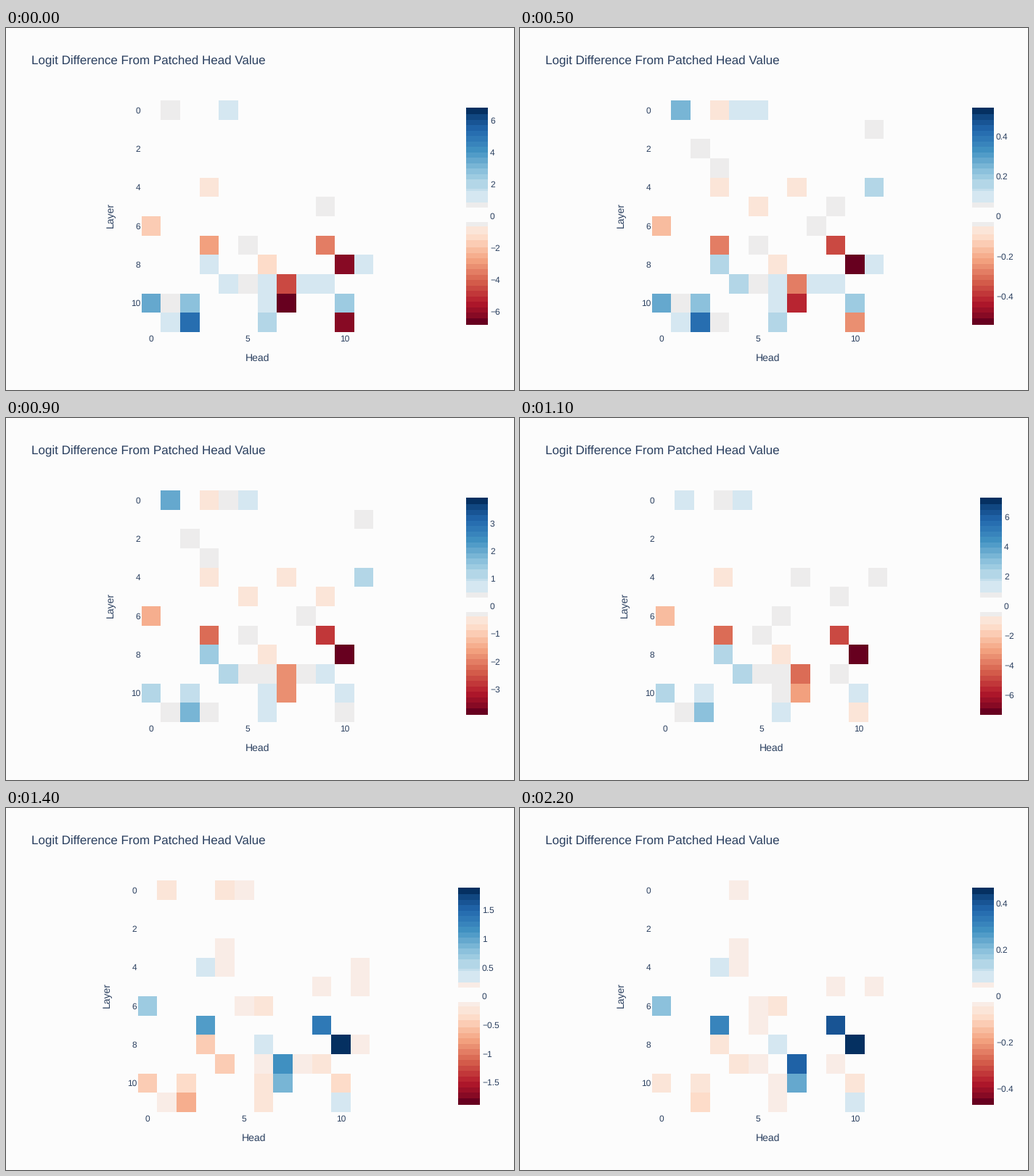
Animation of 700 by 500 pixels, one loop 2.3 s. Source, as a matplotlib script:

```python
import numpy as np
import matplotlib.pyplot as plt
from matplotlib.animation import FuncAnimation

W, H, DPI = 700, 500, 100
FRAMES, INTERVAL = 23, 100
N, TOP, LEFT = 12, 100, 181.7
CELL_W, CELL_H = 319.75 / N, 320 / N
BAR_TOP, BAR_MID, BAR_H = 110, 260, 300
INK = "#2a3f5f"
PAPER = np.array([252, 252, 252])
GREY, CREAM = (237, 236, 236), (249, 236, 230)

plt.rcParams["font.family"] = "Liberation Sans"
plt.rcParams["text.hinting"] = "none"

# Diverging red to blue scale, drawn in flat bands
RDBU = np.array([
    (103, 0, 31), (178, 24, 43), (214, 96, 77), (244, 165, 130),
    (253, 219, 199), (247, 247, 247), (209, 229, 240), (146, 197, 222),
    (67, 147, 195), (33, 102, 172), (5, 48, 97)])
STOPS = np.linspace(-1, 1, len(RDBU))
STEPS = np.linspace(0.34, 0.94, 13)
BLUE_EDGES = np.r_[0.08, 0.127, 0.233, 0.253, STEPS]
RED_EDGES = np.r_[0.053, 0.093, 0.165, 0.22, 0.29, STEPS]

# How a head's effect develops over the loop
TIMES = (3, 7, 11, 22)
STEADY = (.7, 1, .9, .9)
FADE = (1, .5, .42, .42)
DIP = (1, .55, .85, .95)
SPIKE = (.15, 1, .25, .1)
DROP = (1, 0, .15, .15)
LATE = (0, 0, .45, 1)

# (layer, head): strength
GROUPS = [
    (STEADY, {(8, 10): -1.3, (7, 9): -.76, (7, 3): -.61, (6, 0): -.36,
              (8, 3): .36, (9, 4): .32, (5, 9): -.1, (7, 5): -.08,
              (9, 5): -.08}),
    (FADE, {(10, 7): -1, (11, 2): 1, (10, 0): .68, (10, 2): .52,
            (10, 10): .5, (11, 6): .38, (10, 6): .3, (9, 9): .3,
            (11, 1): .23, (9, 6): .2, (9, 8): .18, (8, 11): .17}),
    (DIP, {(9, 7): -.67, (8, 6): -.19, (4, 3): -.15, (0, 4): .175}),
    (SPIKE, {(0, 1): .85, (4, 11): .5, (0, 5): .3, (0, 3): -.25,
             (4, 7): -.25, (5, 5): -.19, (1, 11): -.13, (6, 8): -.13,
             (2, 2): .15, (3, 3): .15, (11, 3): .15}),
    (DROP, {(11, 10): -.9, (10, 1): .16}),
    (LATE, {(6, 6): .24, (6, 5): .16, (3, 4): .16, (4, 4): .16,
            (5, 11): .16}),
]


def build():
    """One strength grid per profile, plus a few faint passing cells."""
    layers = [(profile, np.zeros((N, N))) for profile, _ in GROUPS]
    for (_, grid), (_, heads) in zip(layers, GROUPS):
        for cell, strength in heads.items():
            grid[cell] = strength
    free = np.argwhere(sum(np.abs(g) for _, g in layers) == 0)
    faint = np.zeros((N, N))
    for cell in np.random.default_rng(4).choice(free, 7, replace=False):
        faint[tuple(cell)] = .1
    return layers + [(SPIKE, faint)]


LAYERS = build()


def state(i):
    """Signed shares of the peak, and the peak, at step i."""
    grid = sum(np.interp(i, TIMES, p) * g for p, g in LAYERS)
    blue = np.interp(i, (0, 3, 11, 22), (.75, 1, 1, .45))
    red = np.interp(i, (11, 22), (1, 1.25))
    grid = np.clip(grid * np.where(grid > 0, blue, red), -1, 1)
    scale = np.interp(i, (0, 3, 7, 11, 14, 18, 22),
                      (6.82, .541, .541, 7.32, -1.89, -.703, -.469))
    return np.sign(scale) * grid / np.abs(grid).max(), scale


def snap(m, edges):
    mids = np.r_[0, (edges[1:] + edges[:-1]) / 2, 1]
    return mids[np.searchsorted(edges, m, side="right")]


def shade(v, faint):
    level = np.where(v > 0, snap(v, BLUE_EDGES), -snap(-v, RED_EDGES))
    rgb = np.stack([np.interp(level, STOPS, c) for c in RDBU.T], axis=-1)
    rgb[np.abs(level) < 0.11] = faint
    rgb[level == 0] = PAPER
    return rgb


def tick_step(span):
    rough = span / 9
    base = 10 ** np.floor(np.log10(rough))
    return base * next(m for m in (2, 5, 10) if m * base >= rough)


def edges(start, size):
    return np.floor(start + np.arange(N + 1) * size + .5).astype(int)


fig = plt.figure(figsize=(W / DPI, H / DPI), dpi=DPI, facecolor=PAPER / 255)
ax = fig.add_axes([0, 0, 1, 1])
ax.axis("off")
image = ax.imshow(np.full((H, W, 3), 252, np.uint8), extent=(0, W, H, 0),
                  interpolation="nearest", aspect="auto")
ax.set(xlim=(0, W), ylim=(H, 0))


def label(x, y, s, px, ha="center", **kw):
    return ax.text(x, y, s, fontsize=px * 72 / DPI, color=INK, ha=ha,
                   va="baseline", **kw)


label(35, 49.5, "Logit Difference From Patched Head Value", 17, "left")

sliding = [label(341.5, 460, "Head", 14),
           label(143, 258, "Layer", 14, rotation=90, rotation_mode="anchor")]
sliding += [label(LEFT + (k + .5) * CELL_W, 433, str(k), 12)
            for k in (0, 5, 10)]
sliding += [label(180.2, TOP + (k + .5) * CELL_H + 4.3, str(k), 12, "right")
            for k in range(0, N, 2)]
home = [t.get_position()[0] for t in sliding]
bar_ticks = [(k, label(656, 0, "", 12, "left")) for k in range(-4, 5)]


def draw(i):
    shares, scale = state(i)
    peak = abs(scale)
    faint = GREY if scale > 0 else CREAM
    step = tick_step(2 * peak)
    # Short whole-number labels leave more room for the plot
    shift, bar_x = (5, 634) if step >= 1 else (0, 623)

    stage = np.empty((H, W, 3))
    stage[:] = PAPER
    xs, ys = edges(LEFT + shift, CELL_W), edges(TOP, CELL_H)
    cells = shade(shares, faint)
    for r in range(N):
        for c in range(N):
            stage[ys[r]:ys[r + 1], xs[c]:xs[c + 1]] = cells[r, c]
    y = np.arange(BAR_TOP, BAR_TOP + BAR_H)
    ramp = shade((BAR_MID - y - .5) / (BAR_H / 2), faint)
    stage[y, bar_x:bar_x + 30] = ramp[:, None]
    image.set_data(np.round(stage).astype(np.uint8))

    for t, x in zip(sliding, home):
        t.set_x(x + shift)
    for k, t in bar_ticks:
        v = k * step
        t.set_visible(abs(v) <= peak)
        t.set_text(f"{v:g}".replace("-", "\u2212"))
        t.set_position((bar_x + 33, BAR_MID - v / peak * BAR_H / 2 + 4.3))
    return [image, *sliding, *(t for _, t in bar_ticks)]


anim = FuncAnimation(fig, draw, frames=FRAMES, interval=INTERVAL,
                     repeat=True, repeat_delay=0, blit=False)
plt.show()
```
